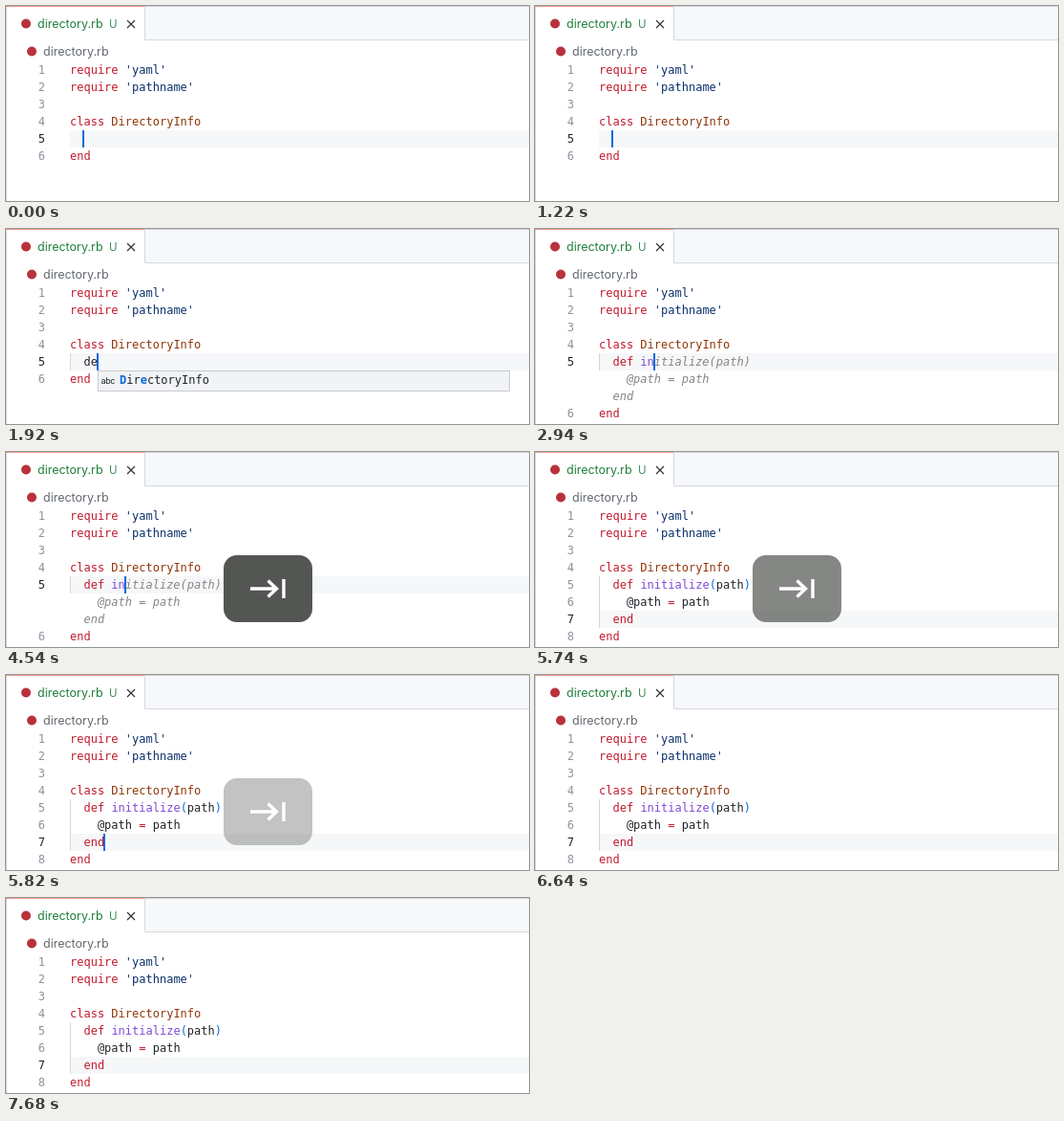
Animation, 548 px wide and 204 px high, one loop 7700 ms. Source, as an HTML page:

```html
<!DOCTYPE html>
<html lang="en">
<head>
<meta charset="utf-8">
<title>Inline completion in an editor</title>
<style>
  html, body { margin: 0; width: 100%; height: 100%; overflow: hidden; background: #fff; }
  svg { display: block; width: 548px; height: 204px; }
  text { white-space: pre; fill: #1f2328; font: 12px "DejaVu Sans Mono", monospace; }
  .ui { font: 12.5px Inter, sans-serif; }
  .num text { fill: #8c959f; text-anchor: end; }
  .num .now { fill: #1f2328; }
  .key { fill: #c2192b; }
  .type { fill: #8f3608; }
  .str { fill: #0a3069; }
  .fn { fill: #7d4bd6; }
  .paren { fill: #0969da; }
  .ghost text { fill: #868686; font-style: italic; }
  .caret rect { width: 2px; height: 18px; fill: #0969da; }
  .guide { fill: #d3d7dc; }
  .icon { fill: #b8323c; }
  .hit { fill: #0969da; font-weight: bold; }
</style>
</head>
<body>
<svg viewBox="0 0 548 204">
  <!-- Window and tab -->
  <path d="M146 1H548V35H146Z" fill="#f6f8fa"/>
  <path d="M0.5 0V204M145.5 0V35.5H548M146 .5H548" fill="none" stroke="#d5d9de"/>
  <path d="M0 .5H145" stroke="#f0a08f"/>
  <circle class="icon" cx="21" cy="18.5" r="5"/>
  <text class="ui" x="33" y="23" style="fill:#1f7f3b">directory.rb</text>
  <text class="ui" x="108" y="23" style="fill:#3b8f55;font-size:11.5px">U</text>
  <path d="M127 15L135 23M135 15L127 23" stroke="#30353b" stroke-width="1.2"/>
  <circle class="icon" cx="27" cy="47.5" r="5"/>
  <text class="ui" x="39" y="52" style="fill:#636970">directory.rb</text>

  <!-- Current line -->
  <g fill="#f6f7f9">
    <path data-on="0-4620" d="M67 130H548V148H67Z"/>
    <path data-on="4620-7700" d="M67 166H548V184H67Z"/>
  </g>
  <rect class="guide" data-on="1540-4620" x="67" y="130" width="1" height="18"/>
  <rect class="guide" data-on="4620-7700" x="67" y="130" width="1" height="54"/>

  <!-- Line numbers -->
  <g class="num">
    <text x="41" y="71">1</text>
    <text x="41" y="89">2</text>
    <text x="41" y="107">3</text>
    <text x="41" y="125">4</text>
    <text data-on="0-4620" class="now" x="41" y="143">5</text>
    <text data-on="0-2540" x="41" y="161">6</text>
    <text data-on="2540-4620" x="41" y="197">6</text>
    <g data-on="4620-7700">
      <text x="41" y="143">5</text>
      <text x="41" y="161">6</text>
      <text class="now" x="41" y="179">7</text>
      <text x="41" y="197">8</text>
    </g>
  </g>

  <!-- Code -->
  <text x="67" y="71"><tspan class="key">require</tspan> <tspan class="str">'yaml'</tspan></text>
  <text x="67" y="89"><tspan class="key">require</tspan> <tspan class="str">'pathname'</tspan></text>
  <text x="67" y="125"><tspan class="key">class</tspan> <tspan class="type">DirectoryInfo</tspan></text>
  <text data-on="0-2540" class="key" x="67" y="161">end</text>
  <text data-on="2540-7700" class="key" x="67" y="197">end</text>

  <text data-on="1540-1920" x="67" y="143">  d</text>
  <text data-on="1920-2020" x="67" y="143">  de</text>
  <text data-on="2020-2100" x="67" y="143">  def</text>
  <text data-on="2100-4620" class="key" x="67" y="143">  def</text>
  <text data-on="2500-4620" class="fn" x="67" y="143">      i</text>
  <text data-on="2780-4620" class="fn" x="67" y="143">       n</text>

  <g class="ghost" data-on="2540-4620">
    <text data-on="2540-2780" x="67" y="143">       nitialize(path)</text>
    <text data-on="2780-4620" x="67" y="143">        itialize(path)</text>
    <text x="67" y="161">    @path = path</text>
    <text x="67" y="179">  end</text>
  </g>

  <g data-on="4620-7700">
    <text x="67" y="143">  <tspan class="key">def</tspan> <tspan class="fn">initialize</tspan><tspan class="paren">(</tspan>path<tspan class="paren">)</tspan></text>
    <text x="67" y="161">    @path <tspan class="key">=</tspan> path</text>
    <text x="67" y="179" class="key">  end</text>
  </g>

  <!-- Suggestion box, following the caret -->
  <g data-on="1600-2320" id="popup">
    <rect x=".5" y="148.5" width="431" height="21" fill="#f2f3f5" stroke="#c6cacf"/>
    <text class="ui" x="3.5" y="161.5" style="font-size:9px;letter-spacing:-.4px">abc</text>
    <text x="23" y="162"><tspan class="hit">D</tspan>ir<tspan id="hitE">e</tspan>ctoryIn<tspan id="hitF">f</tspan>o</text>
  </g>

  <g class="caret">
    <rect data-on="0-620 1180-1540" x="80" y="130"/>
    <rect data-on="1540-1920" x="88" y="130"/>
    <rect data-on="1920-2020" x="95" y="130"/>
    <rect data-on="2020-2320" x="102" y="130"/>
    <rect data-on="2320-2500" x="109" y="130"/>
    <rect data-on="2500-2780" x="117" y="130"/>
    <rect data-on="2780-3440 4040-4620" x="124" y="130"/>
    <rect data-on="4620-5160 5760-6320 6880-7420" x="102" y="166"/>
  </g>

  <!-- Tab key -->
  <g data-on="4540-5900" id="tabKey">
    <rect x="228" y="108" width="93" height="70" rx="14" fill="#535652"/>
    <path d="M256 143H283M274.5 134.5L283.5 143L274.5 151.5M291 133V153" fill="none" stroke="#fff" stroke-width="3.4"/>
  </g>
</svg>
<script>
  const LOOP = 7700;
  const byId = id => document.getElementById(id);
  const popup = byId("popup"), tabKey = byId("tabKey");

  const cues = [...document.querySelectorAll("[data-on]")].map(el => ({
    el,
    spans: el.dataset.on.split(" ").map(span => span.split("-").map(Number))
  }));

  function draw(t) {
    for (const { el, spans } of cues) {
      const on = spans.some(([from, to]) => t >= from && t < to);
      el.style.display = on ? "" : "none";
    }
    const x = t < 1920 ? 89 : t < 2020 ? 96 : 103;
    popup.setAttribute("transform", `translate(${x} 0)`);
    byId("hitE").classList.toggle("hit", t >= 1920);
    byId("hitF").classList.toggle("hit", t >= 2020);
    tabKey.style.opacity = t < 5740 ? 1 : Math.max(0, 0.71 * (5900 - t) / 160);
  }

  const start = performance.now();
  function tick() {
    draw((performance.now() - start) % LOOP);
    requestAnimationFrame(tick);
  }
  tick();
</script>
</body>
</html>
```
